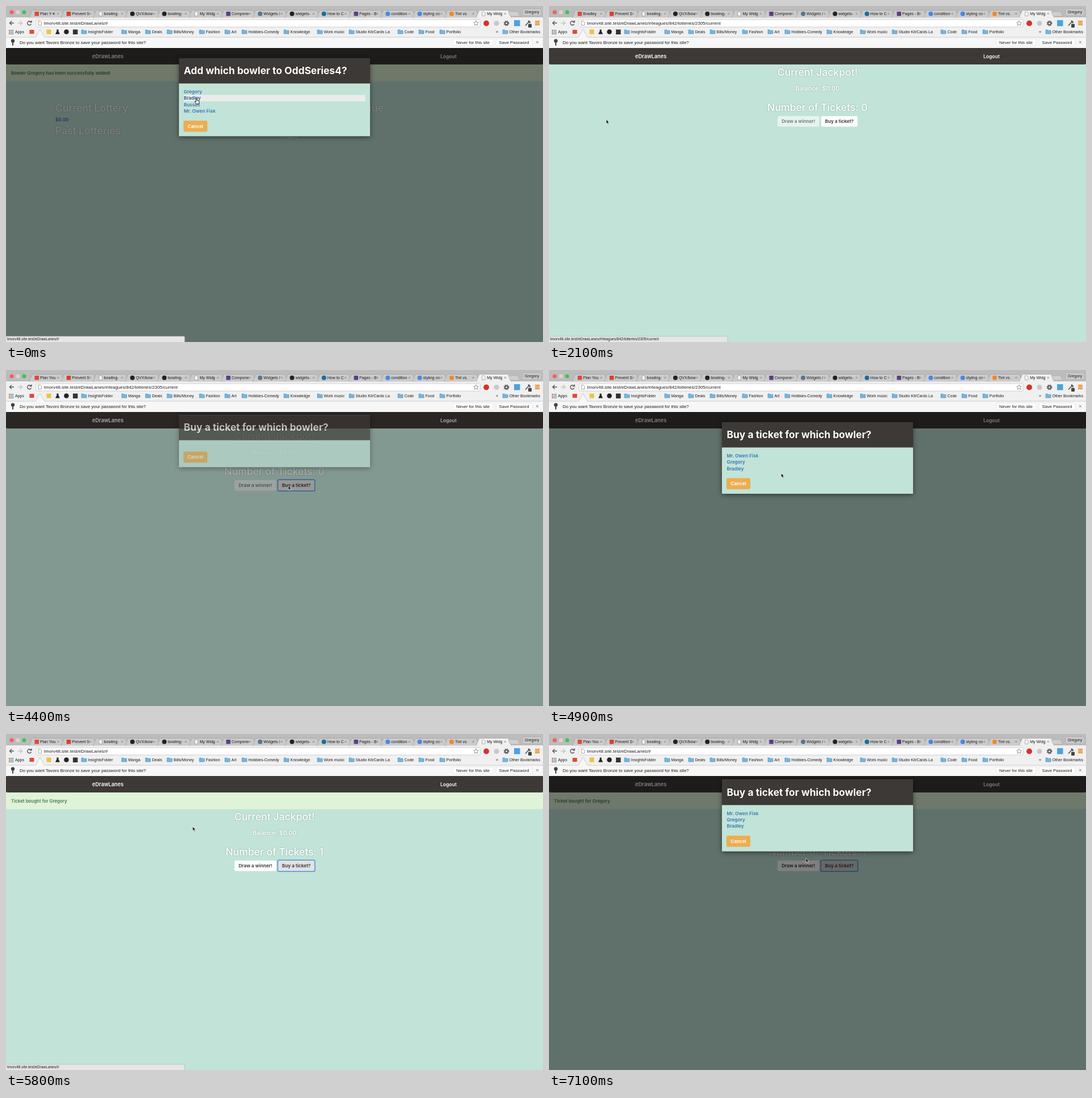
An HTML page that plays this animation: 947x592 px, repeating every 7200 ms.

```html
<!DOCTYPE html>
<html lang="en">
<head>
<meta charset="utf-8">
<title>League lottery</title>
<style>
  html, body { margin: 0; width: 100%; height: 100%; overflow: hidden; background: #c1e3d8; }
  svg { display: block; width: 947px; height: 592px; }
  text { white-space: pre; }
  .ui { font: 7px "Liberation Sans", Arial, sans-serif; fill: #1c1c1c; }
  .app { font: 600 8.2px Inter, "Open Sans", sans-serif; }
  .white { fill: #fff; }
  .head { font-size: 17.6px; font-weight: 500; }
  .title { font-size: 17.4px; font-weight: 700; }
  .mid { text-anchor: middle; }
  .lift { filter: drop-shadow(.7px .9px .8px rgba(0, 0, 0, .28)); }
  .link { fill: #3a74b4; }
  .dark { fill: #333; }
  .box { filter: drop-shadow(0 2.5px 4px rgba(0, 0, 0, .5)); }
</style>
</head>
<body>
<svg viewBox="0 0 947 592">
  <g id="page"></g>
  <g id="chrome">
    <rect width="947" height="21" fill="#bcbcbc"/>
    <circle cx="10" cy="11" r="3.6" fill="#f2605a"/>
    <circle cx="21" cy="11" r="3.6" fill="#dcd3cd"/>
    <circle cx="32" cy="11" r="3.6" fill="#3bc653"/>
    <rect y="20" width="947" height="35" fill="#f0f0f0"/>
    <g id="tabs"></g>
    <path d="M889 18 L886 10 H902 L906 18 Z" fill="#cfcfcf" stroke="#a5a5a5" stroke-width=".6"/>
    <rect x="911" y="5" width="33" height="12" rx="2" fill="#cacaca" stroke="#aaa" stroke-width=".6"/>
    <rect x="53" y="24" width="783" height="13" rx="2" fill="#fff" stroke="#bdbdbd" stroke-width=".7"/>
    <g fill="none" stroke="#555" stroke-width="1.4">
      <path d="M14 30 H6.5 M10 26.5 L6.5 30 L10 33.5"/>
      <path d="M21 30 H28.5 M25 26.5 L28.5 30 L25 33.5" stroke="#c4c4c4"/>
      <path d="M44 28 A3.5 3.5 0 1 0 44.5 31.5 M45 25.5 V28.6 H41.8"/>
      <path d="M57 26.5 H60.5 L62.5 28.5 V34 H57 Z" stroke="#888" stroke-width=".8"/>
      <path d="M829 26 L830.3 28.8 L833.3 29.1 L831 31.2 L831.7 34.2 L829 32.6 L826.3 34.2 L827 31.2 L824.7 29.1 L827.7 28.8 Z" stroke="#777" stroke-width=".8"/>
      <circle cx="882.5" cy="30.5" r="2.6" stroke-width="2"/>
      <circle cx="882.5" cy="30.5" r="4.2" stroke-dasharray="1.65" stroke-width="1.5"/>
      <path d="M916 34.5 L922 28" stroke-width="1.7"/>
      <path d="M921 26 L924.5 29.5" stroke-width="2.6"/>
      <path d="M933 27 H941 M933 30 H941 M933 33 H941" stroke="#ec8a20" stroke-width="1.8"/>
    </g>
    <circle cx="847" cy="30.5" r="5" fill="#d8302f"/>
    <circle cx="865" cy="30.5" r="4.6" fill="#c9c9c9"/>
    <rect x="896" y="25" width="10.5" height="10.5" fill="#4aa3e0"/>
    <rect x="921" y="31.5" width="6" height="6.5" rx="1" fill="#444"/>
    <g id="marks"></g>
    <rect y="55" width="947" height="19" fill="#f7f7f7"/>
    <path d="M0 55 H52 L60 41 L68 55 H947" fill="#f7f7f7" stroke="#c2c2c2" stroke-width=".8"/>
    <circle cx="12" cy="61.5" r="3.2" fill="#444"/>
    <path d="M12 62 V69.5" stroke="#444" stroke-width="2"/>
    <g fill="#fff" stroke="#dcdcdc" stroke-width=".7">
      <rect x="788" y="58" width="71" height="12" rx="1.5"/>
      <rect x="864" y="58" width="64" height="12" rx="1.5"/>
    </g>
    <path d="M935 62 l3.6 3.6 m0 -3.6 l-3.6 3.6" stroke="#666" stroke-width=".9"/>
    <g id="labels"></g>
  </g>
  <g id="live"></g>
  <g id="cursor"></g>
</svg>
<script>
const LOOP = 7200, STEP = 100;
const $ = id => document.getElementById(id);
const site = 'tmorv48.site.test/eDrawLanes/#';
const deep = site + '/leagues/842/lotteries/2305/current';
const league = 'OddSeries4';
const [ann, bob, cal, dan] = ['Gregory', 'Bradley', 'Russell', 'Mr. Owen Fisk'];

const text = (x, y, s, cls = 'ui', more = '') => `<text x="${x}" y="${y}" class="${cls}" ${more}>${s}</text>`;
const rect = (x, y, w, h, fill, more = '') => `<rect x="${x}" y="${y}" width="${w}" height="${h}" fill="${fill}" ${more}/>`;
const dot = (x, y, r, fill) => `<circle cx="${x}" cy="${y}" r="${r}" fill="${fill}"/>`;
const sheet = (x, y) => `<path d="M${x - 2.5} ${y - 3.5} h3.2 l2 2 v5.5 h-5.2 z" fill="#fff" stroke="#888" stroke-width=".7"/>`;
const size = px => `style="font-size:${px}px"`;
const during = (t, from, to) => t >= from && t < to;

// Tab strip
const tabs = [
  ['', '#dc4a3d', 1], ['Prevent S', '#d9402f', 1], ['bowling-'], ['QVX/bow', '#222'], ['bowling-', '#222'],
  ['My Widg'], ['Compone', '#59407f', 1], ['Widgets /', '#5c7590'], ['widgets-', '#222'], ['How to C', '#1b6d9c'],
  ['Pages - B', '#59407f', 1], ['condition', '#4a86e8'], ['styling co', '#4a86e8'], ['Tint vs.', '#f08a24'], ['My Widg']
];
$('tabs').innerHTML = tabs.map(([name, color, square], i) => {
  const x = 54 + 56.3 * i, on = i === tabs.length - 1;
  const icon = !color ? sheet(x, 13.5) : square ? rect(x - 3.5, 10, 7.5, 7.5, color) : dot(x, 13.7, 4, color);
  return `<path d="M${x - 13} 20.5 L${x - 8} 8.5 Q${x - 7.5} 7.5 ${x - 6} 7.5 H${x + 42} Q${x + 43.5} 7.5 ${x + 44} 8.5 L${x + 49} 20.5"
    fill="${on ? '#f0f0f0' : '#cbcbcb'}" stroke="#9f9f9f" stroke-width=".7"/>` + icon + text(x + 6, 16, name) +
    `<path d="M${x + 36.5} 12 l3 3 m0 -3 l-3 3" stroke="#777" stroke-width=".8"/>`;
}).join('');

// Bookmarks bar
const folders = [
  [137, 'InsightsFolder'], [208, 'Manga'], [250, 'Deals'], [288, 'Bills/Money'], [345, 'Fashion'], [390, 'Art'],
  [420, 'Hobbies-Comedy'], [494, 'Knowledge'], [553, 'Work music'], [609, 'Studio Kit/Cards La'],
  [695, 'Code'], [732, 'Food'], [769, 'Portfolio'], [880, 'Other Bookmarks']
];
const dots = ['#d8584e', '#5a9e62', '#5483c8'];
$('marks').innerHTML =
  Array.from({ length: 9 }, (_, i) => rect(5 + i % 3 * 3, 42 + Math.floor(i / 3) * 3, 2, 2, dots[i % 3])).join('') +
  text(16, 48.3, 'Apps') + rect(41.5, 42, 8, 7, '#dc4a3d') + rect(71.5, 41.5, 8, 8, '#f0c244') +
  '<path d="M89.5 41.5 h3 v3 l2.5 5 h-8 l2.5 -5 z" fill="#222"/>' +
  dot(106.5, 45.5, 4.3, '#222') + rect(118, 41.5, 8.5, 8.5, '#333') +
  folders.map(([x, name]) =>
    `<path d="M${x - 4} 42 h3.5 l1 1.2 h4.5 v5.8 h-9 z" fill="#75b5de" stroke="#4b8fbd" stroke-width=".6"/>` +
    text(x + 7.5, 48.3, name)).join('') + text(864, 48, '»');

$('labels').innerHTML =
  text(24, 66.5, 'Do you want Tavoro Bronze to save your password for this site?', 'ui', size(7.9)) +
  text(823.5, 66.5, 'Never for this site', 'ui mid', size(7.6)) +
  text(896, 66.5, 'Save Password', 'ui mid', size(7.6)) + text(927.5, 13.3, ann, 'ui mid');

function button(x, y, w, label, { fill = '#fff', focus = false, alpha = 1 } = {}) {
  const ring = focus ? rect(x - .7, y - .7, w + 1.4, 19.9, 'none', 'rx="2.5" stroke="#4d94da" stroke-width="1.5"') : '';
  return `<g opacity="${alpha}">` + rect(x, y, w, 18.5, fill, 'rx="2"') + ring +
    text(x + w / 2, y + 12.2, label, 'app dark mid') + '</g>';
}

function leaguePage(t) {
  const names = t < 900 ? [dan, ann] : [dan, ann, bob];
  return '<g class="lift">' + text(473.5, 153, league + ' League Page', 'app head white mid') +
    text(87, 186, 'Current Lottery', 'app head white') + text(87, 225.5, 'Past Lotteries', 'app head white') +
    text(482, 186, 'Bowlers in this league', 'app head white') + '</g>' +
    text(87, 203, '$0.00', 'app link') +
    button(483, 195, 129, 'Add Bowlers to ' + league, { fill: '#e6e6e6', focus: true }) +
    names.map((n, i) => text(482, 222 + 11.35 * i, n, 'app white')).join('');
}

function jackpotPage(t) {
  const sold = t >= 5700, focus = t >= 4300;
  const buyFill = t >= 6700 ? '#d0d0d0' : t >= 3400 ? '#e2e2e2' : '#fff';
  return `<g transform="translate(0 ${t >= 5500 ? 29 : 0})"><g class="lift">` +
    text(473.5, 123, 'Current Jackpot!', 'app head white mid') +
    text(473.5, 149, 'Balance: $0.00', 'app white mid', size(10.6)) +
    text(473.5, 185, 'Number of Tickets: ' + +sold, 'app head white mid') + '</g>' +
    button(403, 194, 73.5, 'Draw a winner!', { alpha: sold ? 1 : .6 }) +
    button(480, 194, 64, 'Buy a ticket?', { fill: buyFill, focus }) + '</g>';
}

function alertText(t) {
  if (t < 700) return `Bowler ${ann} has been successfully added!`;
  if (t < 2000) return `Bowler ${bob} has been successfully added!`;
  return t >= 5500 ? 'Ticket bought for ' + ann : '';
}

// Dialogs fade quickly while sliding a quarter of their height.
const FADE = 135, SLIDE = 300;
const addNames = [ann, bob, cal, dan], buyNames = [dan, ann, bob];
const addTitle = `Add which bowler to ${league}?`, buyTitle = 'Buy a ticket for which bowler?';
const dialogs = [
  { open: -1000, close: 747, title: addTitle, names: () => addNames, hover: () => 1 },
  { open: 4311, close: 5556, title: buyTitle, names: t => t < 4500 ? [] : buyNames, hover: t => t >= 5100 ? 1 : -1 },
  { open: 6962, close: 9000, title: buyTitle, names: () => buyNames, hover: () => -1 }
];
const unit = v => Math.min(1, Math.max(0, v));
const slide = v => 1 - (1 - unit(v)) ** 1.67;

function dialog(t) {
  const d = dialogs.find(d => t > d.open && t < d.close + FADE);
  if (!d) return '';
  const closing = t > d.close, age = t - (closing ? d.close : d.open);
  const fade = unit(age / FADE), alpha = closing ? 1 - fade : fade;
  const names = d.names(t), extra = 11.35 * names.length, height = 92 + extra;
  const away = closing ? slide(age / SLIDE) : 1 - slide(age / SLIDE);
  const rows = names.map((n, i) => {
    const y = 59 + 11.35 * i, on = i === d.hover(t);
    return (on ? rect(8, y - 5.6, 321, 11.2, '#e9ede9') : '') +
      text(8.5, y + 3, n, 'app link', on ? 'style="fill:#2b5480"' : '');
  }).join('');
  return rect(0, 74, 947, 518, '#000', `opacity="${alpha / 2}"`) +
    `<g opacity="${alpha}" transform="translate(305 ${92 - away * height / 4})">` +
    rect(0, 0, 337, height, '#c1e3d8', 'class="box"') + rect(0, 0, 337, 44.5, '#3d3936') +
    text(8.5, 28, d.title, 'app title white lift') + rows +
    rect(8, 64.5 + extra, 42, 19.5, '#ecae50', 'rx="2"') + text(29, 77.2 + extra, 'Cancel', 'app white mid') + '</g>';
}

function page(t) {
  const note = alertText(t);
  return rect(0, 74, 947, 518, '#c1e3d8') +
    (note ? rect(0, 103, 947, 29.5, '#dff3d6') + text(9, 121, note, 'app', 'style="font-size:7.9px;fill:#4a7a50"') : '') +
    (t < 2000 ? leaguePage(t) : jackpotPage(t)) +
    rect(0, 73.5, 947, 29.5, '#3d3936', 'rx="2.5"') +
    text(152, 92, 'eDrawLanes', 'app white', size(9.2)) + text(766, 91.5, 'Logout', 'app white', size(8.5)) + dialog(t);
}

function live(t) {
  const url = during(t, 2000, 5500) ? deep : site;
  const status = t < 1000 || during(t, 5200, 6000) ? site : during(t, 1200, 2500) ? deep : '';
  const chimes = t < 1200;
  const mail = during(t, 1700, 2700) ? bob : chimes ? 'Plan Y' : 'Plan You';
  return text(67, 33.3, url, 'ui', size(8)) + text(60, 16, mail) +
    (chimes ? '<path d="M82 12.5 h1.5 l2 -1.5 v5 l-2 -1.5 h-1.5 z" fill="#555"/>' : '') +
    (status ? rect(-1, 582, 316, 11, '#e6e6e6', 'rx="1.5" stroke="#b5b5b5" stroke-width=".7"') +
      text(2, 589.4, status, 'ui', size(6.5)) : '');
}

// Pointer stops: time, x, y
const stops = [
  [600, 336, 163], [800, 275, 160], [1200, 101, 200], [2400, 101, 200], [3500, 498, 204],
  [4600, 498, 204], [5200, 321, 160], [5700, 321, 160], [6500, 511, 233], [6900, 511, 233], [7100, 453, 219]
];
const hands = [[0, 700], [1200, 2000], [3400, 4400], [5100, 5700], [6400, 7000]];
const arrow = '<path d="M0 0 V7.3 L1.7 5.8 L2.9 8.5 L4.2 7.9 L3 5.3 H5.2 Z" fill="#111" stroke="#fff" stroke-width=".6"/>';
const hand = '<path d="M-.9 .7 Q0 -.5 .9 .7 V3.5 L4 4.2 Q5 4.5 4.8 6 L4.1 9.5 H-.4 L-3.2 6 Q-3.3 4.8 -2 5.2 L-.9 6 Z" fill="#fff" stroke="#111" stroke-width=".9"/>';

function pointer(t) {
  const i = stops.findIndex(s => s[0] >= t);
  const b = stops[i], a = stops[Math.max(0, i - 1)];
  const u = a === b ? 0 : (t - a[0]) / (b[0] - a[0]), e = u * u * (3 - 2 * u);
  const x = a[1] + (b[1] - a[1]) * e, y = a[2] + (b[2] - a[2]) * e;
  const shape = hands.some(([from, to]) => during(t, from, to)) ? hand : arrow;
  return `<g transform="translate(${x} ${y})">${shape}</g>`;
}

const start = performance.now();
let shown = -1;
function tick() {
  const t = Math.floor((performance.now() - start) % LOOP / STEP) * STEP;
  if (t !== shown) {
    shown = t;
    $('page').innerHTML = page(t);
    $('live').innerHTML = live(t);
    $('cursor').innerHTML = pointer(t);
  }
  requestAnimationFrame(tick);
}
tick();
</script>
</body>
</html>
```
